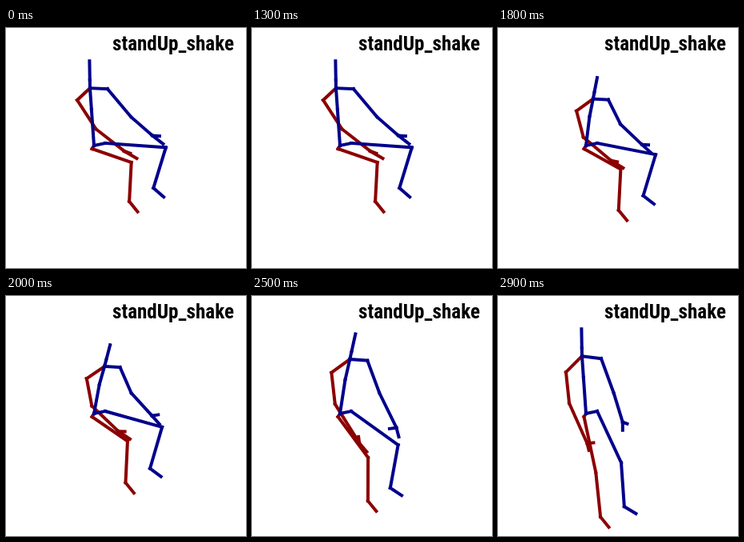
An HTML page with a canvas that plays this animation: 300x300 px, repeating every 3000 ms.

```html
<!DOCTYPE html>
<html lang="en">
<head>
<meta charset="utf-8">
<title>Stand up</title>
<style>
html, body { margin: 0; width: 100%; height: 100%; overflow: hidden; background: #fff; }
canvas { display: block; width: 300px; height: 300px; }
</style>
</head>
<body>
<canvas id="stage" width="300" height="300"></canvas>
<script>
const ctx = document.getElementById('stage').getContext('2d');
const LOOP = 3000, HOLD = 900, TICK = 100;
const RISE_TICK = 5, LAST_TICK = 21;
const NEAR = '#00008b', FAR = '#8b0000';
const PELVIS = [110, 147], NEAR_HIP = [124, 144], FAR_HIP = [107.5, 151];
const TITLE = 'standUp_shake', TITLE_WIDTH = 152;

const clamp = x => Math.min(1, Math.max(0, x));
const smooth = x => x * x * (3 - 2 * x);
const wave = x => Math.sin(Math.PI * x);
const mix = (a, b, k) => [a[0] + (b[0] - a[0]) * k, a[1] + (b[1] - a[1]) * k];
const offset = (p, x, y) => [p[0] + x, p[1] + y];

// End of a bone; 0 degrees points right, 90 down.
function reach(from, length, degrees) {
  const a = degrees * Math.PI / 180;
  return offset(from, length * Math.cos(a), length * Math.sin(a));
}

function bones(color, ...points) {
  ctx.strokeStyle = color;
  for (let i = 1; i < points.length; i++) {
    ctx.beginPath();
    ctx.moveTo(...points[i - 1]);
    ctx.lineTo(...points[i]);
    ctx.stroke();
  }
}

// All motion follows from the tick: a shake of the hands, then the rise.
function motion(tick) {
  const p = clamp((tick - RISE_TICK) / (LAST_TICK - RISE_TICK));
  return {
    p,
    late: p ** 4,
    lean: wave(p ** 1.2),
    slump: wave(p ** 0.6) ** 2,
    settle: 1 - (1 - p) ** 3,
    swing: smooth(p ** 1.5),
    push: wave(p ** 3) ** 2,
    rise: k => k * p + (1 - k) * p ** 3,
    nearShake: wave(clamp((tick - 1) / 4)),
    farShake: tick < RISE_TICK ? wave(tick / 2) ** 2 : 0
  };
}

function drawFarSide(neck, m) {
  const knee = reach(FAR_HIP, 52 + 19 * smooth(m.p ** 2), 19 + 59 * m.rise(0.5));
  const ankle = reach(knee, 49 + 7 * m.p, 93 - 9 * m.late);
  bones(FAR, PELVIS, FAR_HIP, knee, ankle, reach(ankle, 16.5, 51));

  const shoulder = offset(neck, -16 - 4 * m.p - 5 * m.lean, 15 + 5 * m.late);
  const elbow = reach(shoulder, 43 - 9 * m.slump - 4 * m.late, 57 + 27 * m.settle);
  const palm = reach(elbow, 45 + 10 * m.late + 10 * m.push + 18 * m.farShake, 38 + 28 * m.swing);
  const tip = reach(palm, 18 - 9 * m.p ** 3 - 7 * m.farShake, 30 + 46 * m.p ** 3 + 26 * m.farShake);
  bones(FAR, neck, shoulder, elbow, palm, tip);
  bones(FAR, palm, reach(palm, 8, 20 - 25 * m.p - 105 * m.push - 28 * m.farShake));
}

function drawNearSide(neck, m) {
  const knee = reach(NEAR_HIP, 76 - 5 * m.p, 4 + 61 * m.rise(0.3));
  const ankle = reach(knee, 53 + 2 * m.p, 107 - 21 * m.late);
  bones(NEAR, PELVIS, NEAR_HIP, knee, ankle, reach(ankle, 17, 41 - 10 * m.p));

  const shoulder = offset(neck, 22 + 2 * m.late - 3 * m.slump, 1 + 2 * m.late);
  const elbow = reach(shoulder, 46 - 12 * m.slump, 50 + 20 * m.settle);
  const palm = reach(elbow, 35 + 3 * m.settle + 11 * m.push + 8 * m.nearShake, 41 + 32 * m.swing);
  const tip = reach(palm, 17 - 7 * m.p, 38 + 52 * m.swing);
  bones(NEAR, neck, shoulder, elbow, palm, tip);
  bones(NEAR, palm, reach(palm, 9 - 3 * m.p + 2 * m.push, 5 + 15 * m.late - 210 * m.push));
}

function drawTitle() {
  const setFont = size => {
    ctx.font = `900 condensed ${size}px "Roboto Condensed", Roboto, sans-serif`;
  };
  setFont(20);
  setFont(20 * TITLE_WIDTH / ctx.measureText(TITLE).width);
  ctx.fillStyle = '#000';
  ctx.textAlign = 'center';
  ctx.fillText(TITLE, 209, 28);
}

function draw(time) {
  const tick = time < HOLD ? 0 : Math.floor((time - HOLD) / TICK) + 1;
  const m = motion(tick);
  const neck = reach(PELVIS, 72 - 13 * m.slump, -94 + 18 * m.lean);
  const head = reach(neck, 34 - 7 * m.slump, -91 + 17 * m.lean);
  const chest = offset(mix(neck, PELVIS, 0.38), -1.5 * m.lean, 0);

  ctx.fillStyle = '#fff';
  ctx.fillRect(0, 0, 300, 300);
  ctx.lineWidth = 4;
  ctx.lineCap = 'square';
  drawFarSide(neck, m);
  bones(NEAR, PELVIS, chest, neck, mix(neck, head, 0.3), head);
  drawNearSide(neck, m);
  drawTitle();
}

const start = performance.now();
function frame() {
  draw((performance.now() - start) % LOOP);
  requestAnimationFrame(frame);
}
frame();
</script>
</body>
</html>
```
